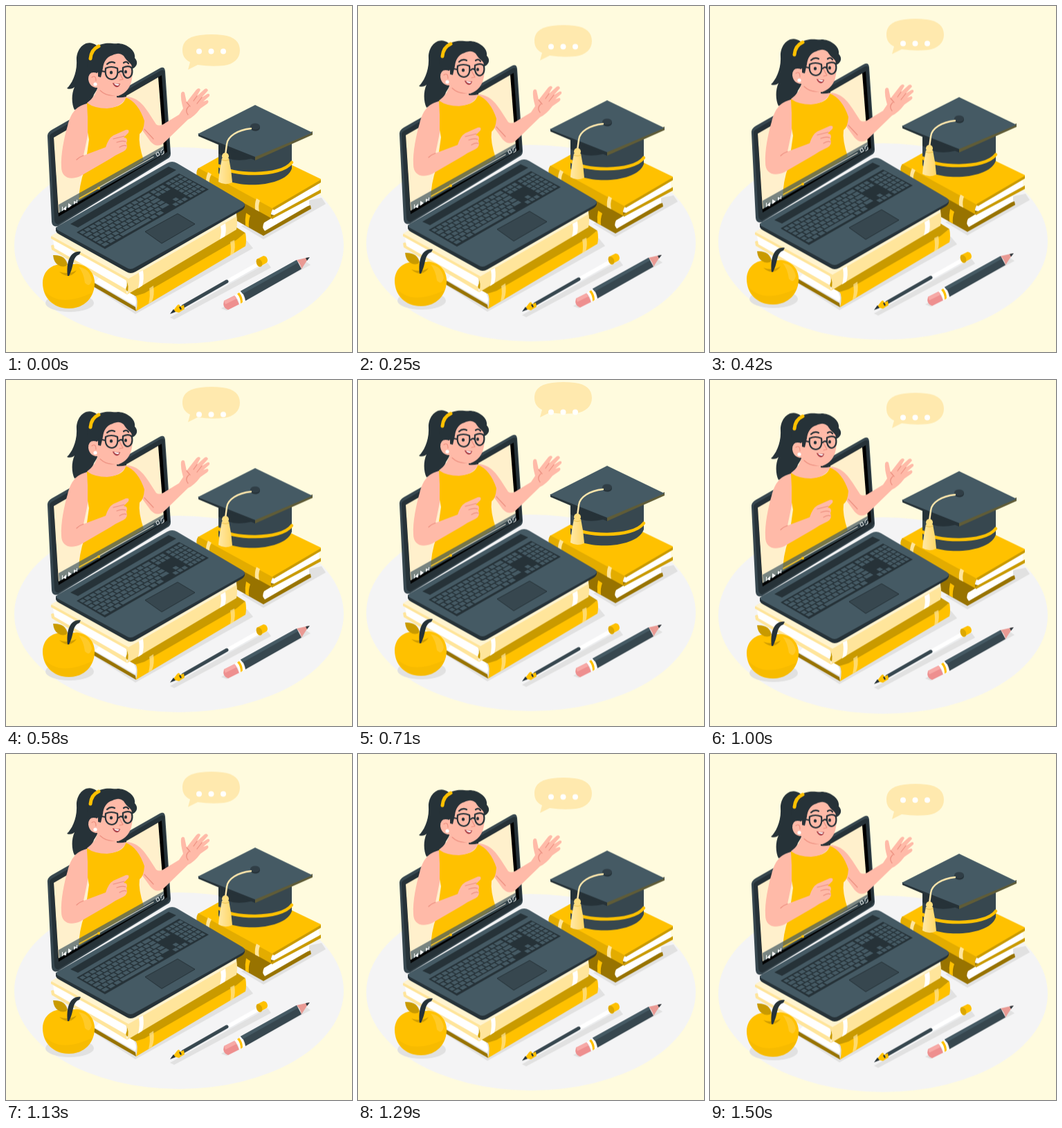
Write an HTML page that moves like this. It is 500 px wide and 500 px high and loops after 1540 ms.

```html
<!DOCTYPE html>
<html lang="en">
<head>
<meta charset="utf-8">
<title>Online lesson</title>
<style>
  html, body { margin: 0; width: 100%; height: 100%; overflow: hidden; background: #fffbde; }
  svg { display: block; width: 100vw; height: 100vh; }
  .bob { animation: bob 770ms linear -60ms infinite alternate; }
  .base { --rise: 10.4px; }
  .mid { --rise: 20.8px; }
  .high { --rise: 41.4px; }
  @keyframes bob {
    from { transform: translateY(calc(var(--rise) * .08)); }
    to { transform: translateY(calc(var(--rise) * -.92)); }
  }
  .y { fill: #ffc100; }
  .gold { fill: #c99a00; }
  .amber { fill: #e3ac00; }
  .brown { fill: #987300; }
  .cream { fill: #ffe59b; }
  .w { fill: #fff; }
  .slate { fill: #455a64; }
  .mid-slate { fill: #37474f; }
  .ink { fill: #263238; }
  .skin { fill: #ffbaa8; }
  .shade { fill: #e1e1e1; }
  .line { fill: none; stroke-linecap: round; stroke-linejoin: round; }
  .crease { stroke: #ed9080; stroke-width: 1.2; }
</style>
</head>
<body>
<svg viewBox="0 0 500 500">
  <defs>
    <linearGradient id="tassel"><stop stop-color="#ffe9a8"/><stop offset="1" stop-color="#ffd766"/></linearGradient>
    <clipPath id="view"><path d="M0 0H300V166L230 205 76 299 0 330Z"/></clipPath>
  </defs>

  <g class="bob base">
    <ellipse cx="250" cy="346" rx="238" ry="142" fill="#f4f4f5"/>

    <!-- ground shadows -->
    <g class="shade">
      <path d="M340 318 372 337 462 286 456 277 441 280Z"/>
      <path d="M120 402 187 445 357 350 348 339 300 340Z"/>
      <ellipse cx="92" cy="429" rx="35" ry="13"/>
      <path d="M237 450 243 453 383 378 378 371Z"/>
      <path d="M311 437 319 440 440 374 428 366Z"/>
    </g>

    <!-- right pile -->
    <path class="brown" d="M317 265 385 302 440 288 441 293 372 332 317 301Z"/>
    <path class="w" d="M373 313 388 304 438 280V288L374 325Q369 320 373 313Z"/>
    <path class="y" d="M347 299 353 303Q350 311 351 320L346 317Q345 308 347 299Z"/>
    <path class="w" d="M386 294 452 256V268L388 304Q384 300 386 294Z"/>
    <path class="gold" d="M384 304 455 265V270L384 308Z"/>
    <path class="y" d="M345 197 455 250V254L386 294 277 235Z"/>
    <path class="gold" d="M455 251V255L387 295 385 292Z"/>
    <path class="amber" d="M278 234 386 293Q381 299 384 307L276 247Q274 239 278 234Z"/>
    <path class="cream" d="M292 240 297 243Q293 250 294 257L289 254Q289 246 292 240ZM362 278 367 281Q364 289 366 297L360 294Q359 285 362 278Z"/>

    <!-- left pile -->
    <path class="brown" d="M124 398 187 435 188 441 124 404Z"/>
    <path class="w" d="M134 393 184 417Q190 425 187 433L128 399Z"/>
    <path class="gold" d="M140 393 187 418 346 328 330 318Z"/>
    <path class="y" d="M178 412 192 417 346 328Q348 339 346 347L188 441Q192 425 187 418Z"/>
    <path class="gold" d="M176 413 187 419 200 415 333 338 344 329 333 323Z"/>
    <path class="cream" d="M324 341 330 338Q332 350 329 358L324 361Q326 351 324 341ZM207 408 213 404Q215 418 211 427L206 430Q209 418 207 408Z" opacity=".7"/>
    <path class="cream" d="M65 346 68 345 173 407 175 417 66 352Z"/>
    <path class="w" d="M68 338 170 389Q178 399 173 409L70 350Z"/>
    <path class="cream" d="M65 333 95 318 187 382 333 301Q335 313 333 323L175 417Q179 403 173 396L65 336Z"/>
    <path fill="#fff4d0" d="M65 332 78 325 185 380 333 298V304L177 394Z"/>
    <path class="w" d="M310 318 317 314Q319 327 316 333L309 337Q312 327 310 318ZM192 385 198 382Q200 395 197 404L191 408Q194 396 192 385Z"/>

    <!-- laptop lid -->
    <path class="mid-slate" d="M60 190Q59 183 66 179L222 90Q229 86 230 94L238 213Q238 219 233 221L75 318Q67 320 66 312Z"/>
    <path class="ink" d="M63 190Q62 186 68 183L224 93Q229 91 229 96L237 213 233 219 76 315Q71 316 70 309Z"/>
    <path fill="#000" d="M69 190 225 100 233 211 76 304Z"/>
    <path fill="#fff0cc" d="M69 190 220 103 228 206 76 299Z"/>

    <!-- teacher -->
    <g clip-path="url(#view)">
      <path class="ink" d="M131 57C116 46 101 61 102 79 103 97 95 113 88 119 93 121 97 119 99 117 94 128 95 142 99 150 108 147 124 140 127 128L135 115Z"/>
      <path class="skin" d="M174 131C190 132 199 143 206 154L217 171Q221 174 227 171L250 157 256 148Q252 134 253 126 255 122 258 125L261 139 275 121Q279 117 281 121L276 130 287 120Q291 118 292 122L283 132 291 127Q295 126 294 130L285 138 291 136Q294 138 291 141L281 148Q272 160 263 164L230 196Q219 207 209 196L190 170Z"/>
      <path class="line crease" d="M261 139 266 145M276 130 271 137M283 132 276 141M264 145Q258 151 263 157M200 178 213 192"/>
      <path class="y" d="M119 139Q130 148 150 147 170 145 173 132 191 139 200 166 199 181 193 185 191 199 199 223L105 285Q105 260 114 235L120 193 111 145Z"/>
      <path class="skin" d="M133 114Q131 130 117 140 128 148 146 148 168 146 174 131L161 130V116Z"/>
      <path class="skin" d="M117 141C101 145 94 154 89 173 84 190 79 215 80 232 80 248 92 252 107 246L145 224Q152 220 158 216L170 210Q177 206 174 198 177 190 170 190L177 183Q179 178 173 179L155 187Q148 191 144 204L112 216 118 187 118 160Z"/>
      <path class="line crease" d="M112 216Q106 218 102 222M155 192 171 188M160 197Q168 194 173 196M164 204Q170 200 174 202"/>
      <path class="ink" d="M160 127 174 119V131Q166 133 160 132Z"/>
      <path class="line crease" d="M136 122Q147 132 160 128"/>
      <path class="skin" d="M133 84 150 64 176 65Q186 84 182 105 179 124 162 130 143 129 134 118 121 119 119 106 119 93 132 97Z"/>
      <path class="ink" d="M120 99C113 79 120 59 139 55 148 52 156 55 161 54 174 54 188 64 186 75 192 81 189 89 181 91 184 82 177 84 170 72 164 67 159 69 154 71 144 74 141 82 140 90L137 103 133 102 133 96Q123 92 120 99Z"/>
      <path class="line" stroke="#ffc100" stroke-width="5" stroke-linecap="butt" d="M122 76Q123 63 134 58"/>
      <path class="line" stroke="#263238" stroke-width="2.2" d="M134 93 143 95M163 96Q166 93 168 95M144 90Q152 86 161 90 163 105 153 106 142 105 144 90ZM169 89Q178 85 182 90 184 102 176 104 168 103 169 89Z"/>
      <g class="ink"><ellipse cx="152" cy="96" rx="2.2" ry="2.6"/><ellipse cx="173" cy="95" rx="2" ry="2.5"/></g>
      <path class="line" stroke="#263238" stroke-width="2.2" d="M146 84Q151 79 157 82M170 82Q174 79 177 83"/>
      <path class="line crease" d="M164 97 169 106 164 107M124 103Q130 99 130 108"/>
      <path fill="#a83c45" d="M154 111Q160 113 165 112 164 118 159 117 155 115 154 111Z"/>
      <path class="w" d="M156 112 164 113 162 115Q158 115 156 112Z"/>
      <circle cx="129" cy="113" r="2.6" class="w"/>
    </g>

    <!-- player bar -->
    <path d="M76 287 228 202 229 213 77 299Z" fill="#455a64" opacity=".72"/>
    <g class="line" stroke-width="1.4">
      <path stroke="#cfcfc6" d="M106 278 213 218"/>
      <path stroke="#ffc100" d="M106 278 134 263"/>
    </g>
    <circle cx="134" cy="263" r="2" class="y"/>
    <path class="w" d="M81 290V296H82V290ZM87 289V295L82 294ZM90 285 95 288 90 292ZM98 282 102 283 98 287ZM102 280V285H103V280Z"/>
    <path class="line" stroke="#fff" d="M217 213 220 211 222 215 219 217ZM224 212V209L227 207M228 210V213L225 215"/>

    <!-- laptop base -->
    <path class="ink" d="M72 320V325Q73 328 77 330L174 384Q180 388 187 384L341 295Q346 292 345 286Z"/>
    <path class="slate" d="M75 318 233 227Q240 223 247 227L342 283Q348 287 342 291L186 378Q180 382 174 378L75 324Q70 321 75 318Z"/>
    <path class="ink" d="M93 315 235 232 246 237 104 320Z"/>
    <path class="ink" d="M102 327 250 242 293 265 143 351Z"/>
    <path id="keys" class="slate" transform="matrix(.987 -.56 .867 .49 104 327)"/>
    <path class="mid-slate" stroke="#263238" d="M201 326 248 300 273 315 225 343Z"/>

    <!-- apple -->
    <path class="y" d="M90 375C101 369 126 374 128 398 129 421 113 437 91 437 68 437 53 421 53 400 54 376 76 370 90 375Z"/>
    <path fill="#ffca28" d="M105 377Q121 379 124 396 121 408 114 400 112 385 105 377Z"/>
    <path fill="#e9b000" d="M55 411Q77 437 125 414 116 437 91 437 65 436 55 411Z" opacity=".35"/>
    <path fill="#d19e00" d="M77 384Q84 390 91 390 98 388 102 382 94 386 89 386 82 386 77 384Z"/>
    <path class="gold" d="M68 360Q86 359 89 374 83 379 75 374 69 370 68 360Z"/>
    <path class="ink" d="M89 390C87 371 92 353 108 355L106 359C95 363 99 375 91 390Z"/>

    <!-- pen -->
    <path class="line" stroke="#fff" stroke-width="6" d="M318 399 364 373"/>
    <path class="line" stroke="#e9ebed" stroke-width="1.2" d="M321 402 365 377"/>
    <path class="line" stroke="#37474f" stroke-width="5" d="M256 434 319 398"/>
    <path class="y" d="M241 441 247 433Q250 429 252 434L257 432 258 438 253 441 250 443Z"/>
    <path class="ink" d="M237 445 242 438 245 442ZM250 435 252 434 254 438 252 439Z"/>
    <path class="y" d="M362 366 372 361Q377 361 378 367 378 371 375 372L366 377Q361 374 362 366Z"/>
    <ellipse cx="366" cy="371" rx="4" ry="6" transform="rotate(-25 366 371)" fill="#dca700"/>

    <!-- pencil -->
    <path fill="#ee8f8f" d="M315 426 331 418 337 431 321 439Q312 436 315 426Z"/>
    <path fill="#f7a9a6" d="M315 426 331 418 333 423 317 431Z"/>
    <path class="w" d="M330 418 340 412 346 426 337 431Q336 423 330 418Z"/>
    <path class="y" d="M334 416 337 414Q342 420 342 428L339 430Q339 421 334 416Z"/>
    <path class="mid-slate" d="M339 412 420 367 427 380 346 426Q345 417 339 412Z"/>
    <path class="slate" d="M339 412 420 367 422 371 342 416Z"/>
    <path fill="#e99a94" d="M420 367 438 363 427 380Q426 373 420 367Z"/>
    <path class="ink" d="M433 364 439 363 435 368Z"/>
  </g>

  <!-- graduation cap -->
  <g class="bob mid">
    <path class="mid-slate" d="M307 190V241C316 265 403 265 413 235V190Z"/>
    <path class="ink" d="M307 190V213Q333 232 372 214L360 205Z"/>
    <path class="line" stroke="#ffc100" stroke-width="4.5" stroke-linecap="butt" d="M308 231C324 245 397 248 413 226"/>
    <path class="ink" d="M278 184 360 217V223L278 188Z"/>
    <path fill="#5f5c38" d="M360 216 443 181V186L360 223Z"/>
    <path class="slate" d="M277 185 360 143 443 183 360 218Z"/>
    <path class="ink" d="M353 174V176C355 182 366 182 367 176V174Z"/>
    <ellipse cx="360" cy="174" rx="7" ry="4.5" fill="#303e46"/>
    <path class="line" stroke="#ffe9ae" stroke-width="2.4" d="M354 177C335 179 320 188 319 200L317 215"/>
    <path fill="url(#tassel)" d="M312 220Q308 240 307 254 316 260 327 255 326 238 322 220Z"/>
    <circle cx="317" cy="217" r="5" fill="#ffdf80"/>
    <path class="line" stroke="#e9bf48" d="M312 222Q317 225 322 222"/>
  </g>

  <path class="bob high" fill="#ffe9ae" d="M281 42Q297 40 313 42C330 44 338 52 338 64 338 76 329 84 315 86Q296 88 277 85L263 92 266 81C258 77 255 71 255 64 255 51 264 44 281 42Z"/>
  <g class="bob mid w">
    <circle cx="279" cy="65.5" r="4"/><circle cx="296.5" cy="65.5" r="4"/><circle cx="314" cy="65.5" r="4"/>
  </g>
</svg>
<script>
  // Key rows in flat units; the path's matrix lays them on the laptop.
  const key = (x, y, w) => `M${x} ${y}h${w}v5.6h${-w}z`;
  let d = '';
  for (let row = 0; row < 6; row++) {
    const y = 1 + row * 7.3, shift = row % 2 * 3;
    if (row === 5) {
      d += key(1, y, 7) + key(10, y, 7) + key(19, y, 7) + key(28, y, 42) + key(72, y, 7) + key(81, y, 7);
    } else {
      d += key(1, y, 5 + shift);
      for (let i = 1; i < 12; i++) d += key(i * 7.7 + shift, y, 6.2);
      d += key(92.4 + shift, y, 10 - shift);
    }
    for (let i = 0; i < 3; i++) {
      if (row < 2 || row === 5 || (row === 4 && i === 1)) d += key(105 + i * 6.6, y, 5.2);
    }
    for (let i = 0; i < 4; i++) d += key(127 + i * 5.8, y, 4.6);
  }
  document.getElementById('keys').setAttribute('d', d);
</script>
</body>
</html>
```
